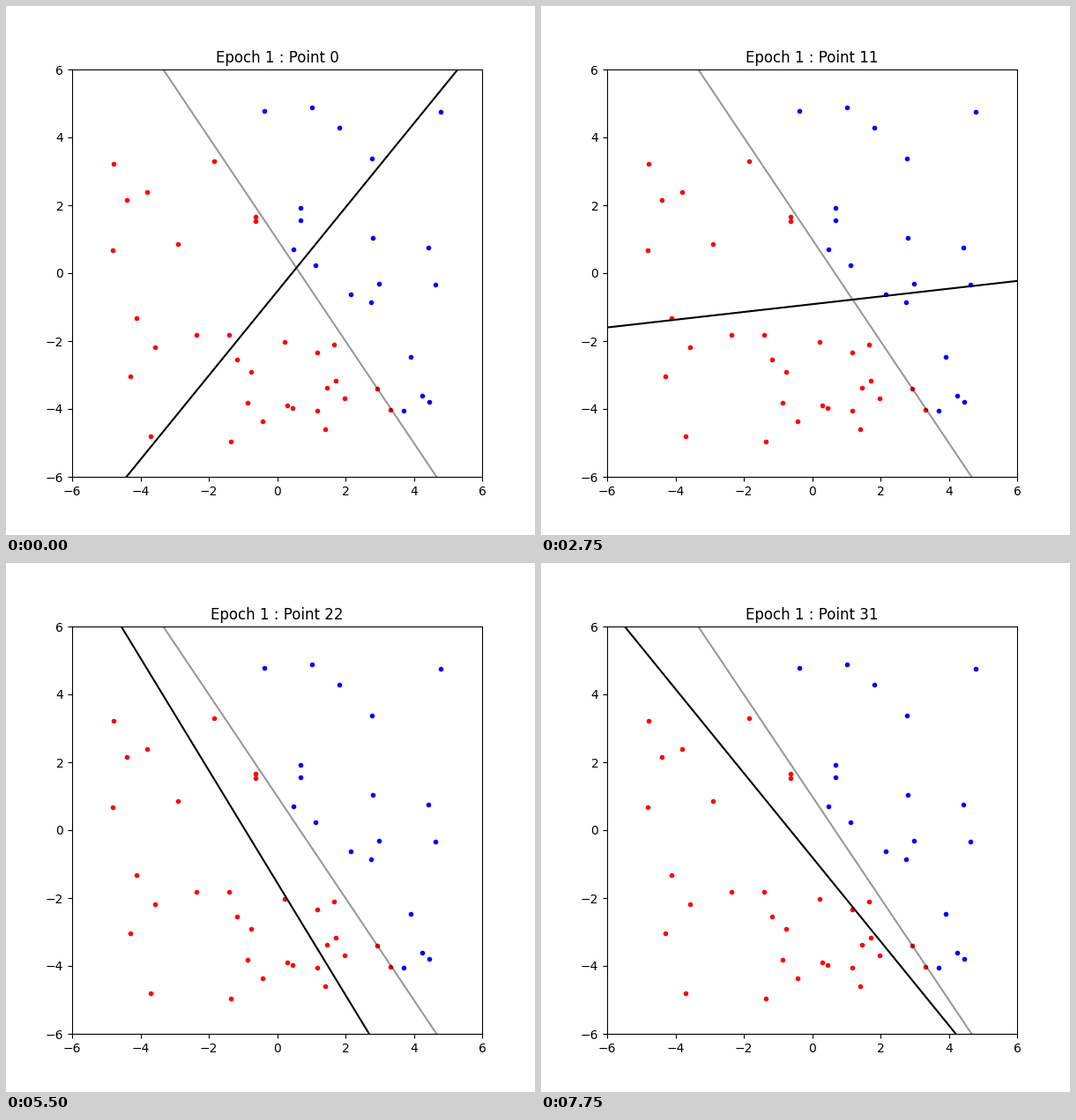
A matplotlib script that plays this animation: 600x600 px, repeating every 8000 ms.

```python
import numpy as np
import matplotlib.pyplot as plt
from matplotlib.animation import FuncAnimation

FRAMES = 32
INTERVAL = 250
LIMIT = 6
POINTS = 50
RATE = 0.1

np.random.seed(0)
x = np.random.uniform(-5, 5, POINTS)
y = np.random.uniform(-5, 5, POINTS)
weights = np.random.randn(3)

above = y > -1.5 * x + 1
inputs = np.column_stack([x, y, np.ones(POINTS)])


def train(w, i):
    """One logistic gradient step on point i."""
    guess = 1 / (1 + np.exp(-inputs[i] @ w))
    return w + RATE * (above[i] - guess) * inputs[i]


# Each frame shows the weights before its own point is learned;
# the first point is learned once ahead of the run.
history = [train(weights, 0)]
for i in range(FRAMES - 1):
    history.append(train(history[-1], i))

xs = np.array([-LIMIT, LIMIT])
fig, ax = plt.subplots(figsize=(6, 6), dpi=100)
fig.subplots_adjust(left=0.125, right=0.9, bottom=0.11, top=0.88)
ax.set_xlim(-LIMIT, LIMIT)
ax.set_ylim(-LIMIT, LIMIT)

ax.plot(x[above], y[above], "b.")
ax.plot(x[~above], y[~above], "r.")
ax.plot(xs, -1.5 * xs + 1, color="black", alpha=0.4)
boundary, = ax.plot([], [], color="black")
title = ax.set_title("")


def update(point):
    wx, wy, bias = history[point]
    boundary.set_data(xs, -(wx * xs + bias) / wy)
    title.set_text(f"Epoch 1 : Point {point}")
    return boundary, title


anim = FuncAnimation(fig, update, frames=FRAMES, interval=INTERVAL,
                     repeat=True, repeat_delay=0)
plt.show()
```
